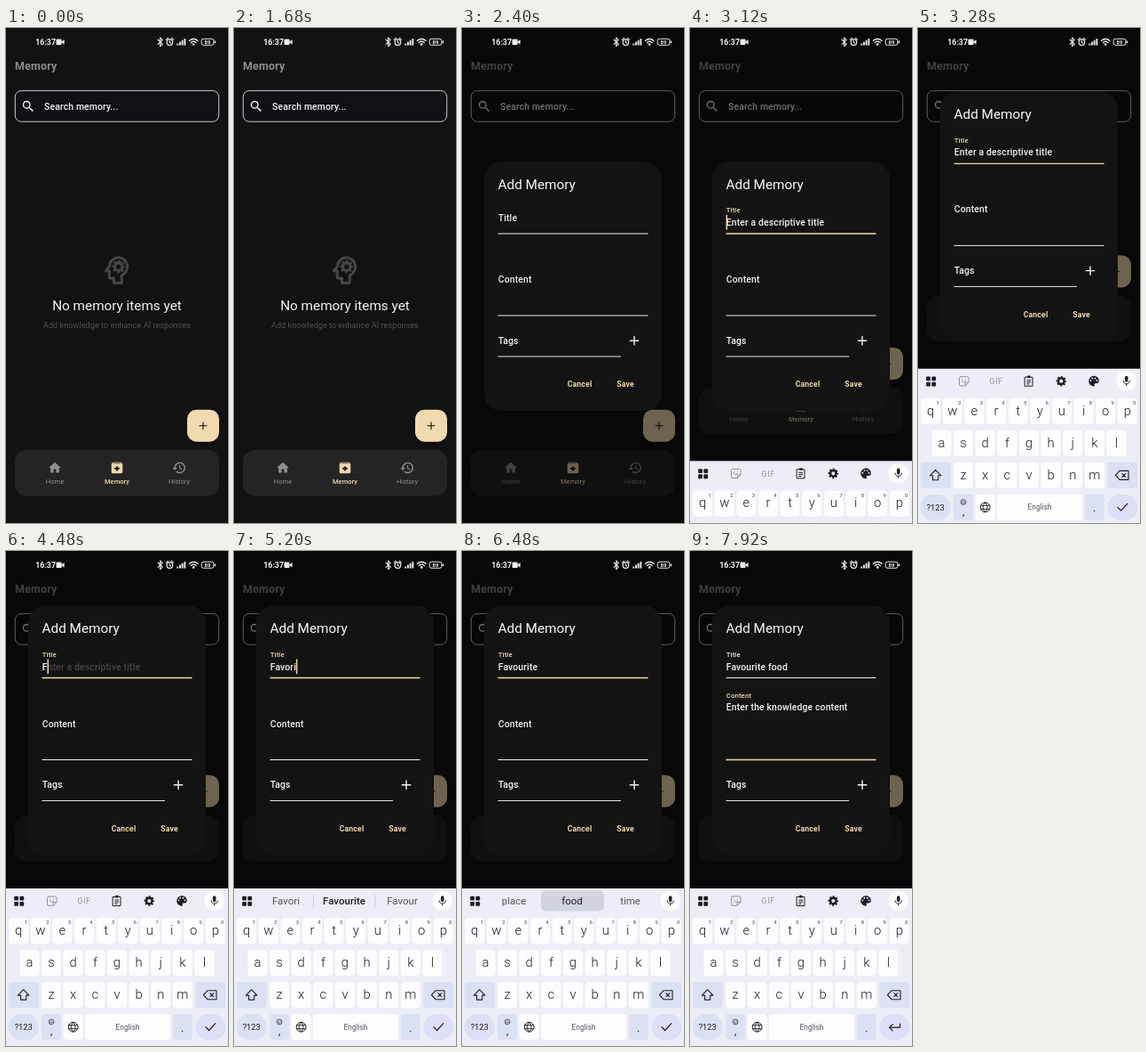
These frames come from a looping animation (250 px wide and 556 px high, 8 s). An HTML page:

```html
<!DOCTYPE html>
<html lang="en">
<head>
<meta charset="utf-8">
<title>Add memory</title>
<style>
html, body { margin: 0; width: 100%; height: 100%; overflow: hidden; background: #121212; }
svg { display: block; width: 100%; height: 100%; }
text { font-family: Roboto, "Noto Sans", sans-serif; white-space: pre; }
.m { text-anchor: middle; }
.field { font-size: 10.4px; font-weight: 500; letter-spacing: .15px; fill: #f4f4f4; }
.line { fill: none; stroke-linecap: round; stroke-linejoin: round; }
</style>
</head>
<body>
<svg id="stage" viewBox="0 0 250 556"></svg>
<script>
const GOLD = '#f0d9ae', INK = '#1d1d22', KEY = '#fdfdff', SIDE = '#dce0f3';
const KEYBOARD = 177;

const text = (x, y, s, size, fill, more = '') =>
  `<text x="${x}" y="${y}" font-size="${size}" fill="${fill}" ${more}>${s}</text>`;
const mid = (x, y, s, size, fill, more = '') => text(x, y, s, size, fill, 'class="m" ' + more);
const rect = (x, y, w, h, r, fill, more = '') =>
  `<rect x="${x}" y="${y}" width="${w}" height="${h}" rx="${r}" fill="${fill}" ${more}/>`;
const line = (d, color, w, more = '') =>
  `<path class="line" d="${d}" stroke="${color}" stroke-width="${w}" ${more}/>`;
const circle = (x, y, r, fill, more = '') => `<circle cx="${x}" cy="${y}" r="${r}" fill="${fill}" ${more}/>`;
// Places content drawn on a 24-unit grid, centred on x, y
const icon = (x, y, size, body) =>
  `<g transform="translate(${x - size / 2} ${y - size / 2}) scale(${size / 24})">${body}</g>`;
const solid = (d, fill) => `<path d="${d}" fill="${fill}" fill-rule="evenodd"/>`;
const gear = (fill, r) =>
  circle(12, 12, r * .6, 'none', `stroke="${fill}" stroke-width="${r * .46}"`) +
  circle(12, 12, r * .87, 'none',
    `stroke="${fill}" stroke-width="${r * .32}" pathLength="16" stroke-dasharray="1 1" stroke-dashoffset=".5"`);

const HOME = 'M10 20v-6h4v6h5v-8h3L12 3 2 12h3v8z';
const BOX = 'M20.5 5.2L19.1 3.5Q18.7 3 18 3H6Q5.3 3 4.8 3.5L3.5 5.2Q3 5.8 3 6.5V19a2 2 0 0 0 2 2h14a2 2 0 0 0 2-2V6.5Q21 5.8 20.5 5.2zM12 17.5L6.5 12H10v-2h4v2h3.5zM5.1 5l.8-1h12l.9 1z';
const HISTORY = 'M13 3a9 9 0 0 0-9 9H1l3.9 3.9L9 12H6a7 7 0 1 1 2.06 4.94l-1.42 1.42A9 9 0 1 0 13 3zM12 8v5l4.3 2.5.7-1.2-3.5-2.1V8z';
const SEARCH = 'M15.5 14h-.8l-.3-.3A6.5 6.5 0 1 0 13.7 14.4l.3.3v.8l5 5 1.5-1.5zM9.5 14a4.5 4.5 0 1 1 0-9 4.5 4.5 0 0 1 0 9z';
const MIC = 'M12 14a3 3 0 0 0 3-3V5a3 3 0 0 0-6 0v6a3 3 0 0 0 3 3zM17.3 11a5.3 5.3 0 0 1-10.6 0H5c0 3.4 2.7 6.2 6 6.7V21h2v-3.3c3.3-.5 6-3.3 6-6.7z';
const HEAD = 'M13 4a6.2 6.2 0 0 0-6 6L4.8 12.7H7v3.8a1 1 0 0 0 1 1h2v3h5v-4.8A6.1 6.1 0 0 0 13 4z';
const PALETTE = 'M12 3a9 9 0 0 0 0 18q1.5 0 1.5-1.5l-.4-1q-1-2.5 1.1-2.5H16a5 5 0 0 0 5-5c0-4.4-4-8-9-8z';

function page() {
  const tab = (x, d, name, fill, weight) =>
    icon(x, 494, 16.7, solid(d, fill)) + mid(x, 511.6, name, 7.6, fill, `font-weight="${weight}"`);
  return rect(0, 0, 250, 556, 0, '#121212') +
    text(10, 47, 'Memory', 12.5, '#8d8d8d', 'font-weight="700" letter-spacing=".15"') +
    rect(10.3, 70.4, 229.4, 34.8, 7, '#101015', 'stroke="#e2e2e2" stroke-width=".9"') +
    icon(25, 88, 16.7, solid(SEARCH, '#f5f5f5')) +
    text(43, 91.5, 'Search memory...', 10.4, '#eee', 'class="field"') +
    `<g id="empty">` +
    icon(125, 271.6, 41.7, line(HEAD, '#454545', 1.8) + icon(13, 10, 10, gear('#454545', 10))) +
    mid(125, 317.3, 'No memory items yet', 15.3, '#f4f4f4') +
    mid(125, 336.7, 'Add knowledge to enhance AI responses', 9, '#505050', 'letter-spacing=".1"') +
    `</g><g id="bottom">` +
    rect(10, 474, 230, 51.5, 13, '#242424') +
    tab(55, HOME, 'Home', '#8f8f8f', 400) + tab(125, BOX, 'Memory', GOLD, 500) + tab(195, HISTORY, 'History', '#8f8f8f', 400) +
    rect(203, 430, 38, 38, 12, '#000', 'opacity=".2"') +
    rect(204, 428.7, 36, 36, 10.5, GOLD) + line('M218 446.7h8M222 442.7v8', '#111', 1.1) + `</g>`;
}

function dialog() {
  const under = (id, y, x2) =>
    `<line id="${id}" x1="40.5" x2="${x2}" y1="${y}" y2="${y}" stroke="#e8e8e8" stroke-width="1"/>`;
  const field = (id, x, y, s) => `<text id="${id}" class="field" x="${x}" y="${y}">${s}</text>`;
  const button = (x, s) => text(x, 403.1, s, 8.7, GOLD, 'font-weight="600" letter-spacing=".15"');
  return rect(25, 150, 200, 280, 19.5, '#131313') +
    text(40.6, 180.8, 'Add Memory', 15.3, '#f8f8f8') +
    field('label1', 0, 0, 'Title') + field('hint1', 40.7, 222, 'Enter a descriptive title') +
    field('value', 40.7, 222, '') + under('under1', 231, 209.5) +
    field('label2', 0, 0, 'Content') + field('hint2', 40.7, 267.6, 'Enter the knowledge content') +
    under('under2', 323, 209.5) +
    field('label3', 40.7, 354.7, 'Tags') + under('under3', 369, 179) +
    line('M189.3 351.2h9.4M194 346.5v9.4', '#f2f2f2', 1.4, 'stroke-linecap="butt"') +
    button(118.7, 'Cancel') + button(174.2, 'Save') +
    rect(0, 0, 1.5, 16.6, 0, GOLD, 'id="caret"');
}

function status() {
  const w = '#ececec';
  const bars = [0, 1, 2, 3].map(i => rect(192.3 + i * 2.7, 17.4 - i * 1.8, 1.9, 2 + i * 1.8, .3, w)).join('');
  return text(33.3, 18.9, '16:37', 8.8, '#f5f5f5', 'font-weight="700"') +
    rect(56.5, 12.5, 6.2, 6.4, 1.2, w) + `<path d="M62 15.7l3.6-2.8v5.6z" fill="${w}"/>` +
    line('M171 13l5.200 5-2.600 2.500v-9.600l2.600 2.500-5.200 5', w, 1.1) +
    circle(184.4, 16, 3.3, 'none', `stroke="${w}" stroke-width="1.2"`) +
    line('M184.400 14.300v1.900l1.200.8M180.300 13.100l2.200-1.900M188.500 13.100l-2.200-1.900', w, 1.1) +
    bars + line('M206.400 14.300q4.800-4.200 9.600 0M208.200 16.400q3-2.700 6 0', w, 1.4) + circle(211.2, 18.4, 1.4, w) +
    rect(220.2, 12.2, 13.6, 7, 2, 'none', `stroke="${w}"`) + rect(234.6, 14.2, 1.4, 3, .5, w) +
    mid(227, 17.9, '89', 6, w, 'font-weight="700"');
}

function keyboard() {
  const step = 24.62, rowY = i => 426.7 + 36 * i;
  const key = (x, y, w, fill, r = 4) => rect(x - w / 2, y - 14.6, w, 29.2, r, fill);
  let s = rect(0, 379, 250, 180, 0, '#ecedf6');
  ['qwertyuiop', 'asdfghjkl', 'zxcvbnm'].forEach((row, i) => {
    [...row].forEach((c, j) => {
      const x = [14.2, 26.5, 51.1][i] + step * j, y = rowY(i);
      s += key(x, y, 22, KEY) + mid(x, y + 4.2, c, 14.8, INK, 'font-weight="350" data-key');
      if (!i) s += mid(x + 8, y - 7.3, (j + 1) % 10, 6, '#44444c');
    });
  });
  const y3 = rowY(2), y4 = rowY(3);
  s += key(19.7, y3, 34, SIDE) + line(`M19.7 ${y3 - 6}l6.3 6.4h-3.2v5h-6.2v-5h-3.2z`, INK, 1.1, 'id="shift"');
  s += key(230.3, y3, 34, SIDE) + line(`M227 ${y3 - 5}h10v10h-10l-4.6-5zM229.8 ${y3 - 2}l4 4m0-4l-4 4`, INK, 1.1);
  s += key(19.7, y4, 34, SIDE, 14.6) + mid(19.7, y4 + 3.3, '?123', 9.3, INK);
  s += key(51.1, y4, 22, SIDE) + mid(51.1, y4 + 8.6, ',', 12, INK) +
    circle(51.1, y4 - 5.8, 2.9, 'none', `stroke="${INK}" stroke-width=".7"`) +
    line(`M49.7 ${y4 - 5.2}q1.4 1.7 2.8 0M50 ${y4 - 6.8}v.1M52.2 ${y4 - 6.8}v.1`, INK, .7);
  s += key(75.6, y4, 22, KEY) + circle(75.6, y4, 5.4, 'none', `stroke="${INK}"`) +
    line(`M70.5 ${y4 - 2}h10.2m0 4h-10.2M75.6 ${y4 - 5.4}q-5 5.4 0 10.8q5-5.4 0-10.8`, INK, .9);
  s += key(137, y4, 96, KEY) + mid(137, y4 + 3, 'English', 8.3, '#55555e');
  s += key(198.8, y4, 22, SIDE) + mid(198.8, y4 + 5, '.', 13, INK);
  s += key(230.3, y4, 34, '#dcdff7', 14.6) +
    line(`M225 ${y4}l3.6 3.8 7.2-7.8`, INK, 1.2, 'id="check"') +
    line(`M236.5 ${y4 - 3.5}v4h-12m3.6-3.6l-3.6 3.6 3.6 3.6`, INK, 1.2, 'id="return"');

  // Strip above the keys
  s += rect(9.2, 387.8, 4.8, 4.8, 1, INK) + rect(15.4, 387.8, 4.8, 4.8, 1.2, INK) +
    rect(9.2, 394, 4.8, 4.8, 1, INK) + rect(15.4, 394, 4.8, 4.8, 1, INK) +
    circle(234.7, 393, 11.2, KEY) + icon(234.7, 393, 14, solid(MIC, INK));
  const gray = '#9293a0';
  s += `<g id="tools">` +
    line('M48 388h7.5q1.5 0 1.5 1.5v5l-3.7 3.8h-5.3q-1.500 0-1.500-1.500v-7.300q0-1.500 1.500-1.500zM53.300 398v-3.500h3.500M49.800 391v.2M53.600 391v.2M49.700 393.300q1.900 1.800 3.800 0', gray, 1) +
    mid(88.2, 396.2, 'GIF', 8.6, gray, 'letter-spacing=".8"') +
    line('M120.5 388.5h8.5v10h-8.5zM122.8 392h3.9m0 2.1h-3.9m0 2.1h2.4', INK, 1) + rect(123, 386.8, 3.6, 2.6, 1, INK) +
    icon(161.3, 393, 14, gear(INK, 9.6)) +
    icon(198, 393, 15.5, solid(PALETTE, INK) +
      [[6.5, 11], [9.5, 7], [14.5, 7], [17.5, 11]].map(([x, y]) => circle(x, y, 1.5, '#ecedf6')).join('')) +
    `</g><g id="words">` + line('M89.5 386.5v13M159 386.5v13', '#c3c4cf', .8) +
    rect(89, 381.5, 70.5, 23, 5, '#d2d3dd', 'id="press"') +
    [58.5, 124, 189.5].map((x, i) => mid(x, 397, '', 11.5, i === 1 ? INK : '#55555e', 'data-word')).join('') + `</g>`;
  return s;
}

const stage = document.getElementById('stage');
stage.innerHTML = page() + rect(0, 0, 250, 556, 0, '#000', 'id="scrim"') +
  `<g id="dialog">${dialog()}</g>` + status() + `<g id="keyboard">${keyboard()}</g>`;

const el = {};
stage.querySelectorAll('[id]').forEach(e => el[e.id] = e);
const keys = [...stage.querySelectorAll('[data-key]')], words = [...stage.querySelectorAll('[data-word]')];
const letters = keys.map(k => k.textContent);

const ramp = (t, a, b) => Math.min(1, Math.max(0, (t - a) / (b - a)));
const out = u => 1 - (1 - u) ** 3;
const mix = (a, b, u) => a + (b - a) * u;
const within = (t, ...spans) => spans.some(([a, b]) => t >= a && t < b);
const last = (list, t) => list.reduce((v, [at, x]) => t >= at ? x : v, list[0][1]);
const set = (e, attrs) => { for (const k in attrs) e.setAttribute(k, attrs[k]); };
const show = (e, on) => set(e, { opacity: +on });
const write = (e, s) => { if (e.textContent !== s) e.textContent = s; };

const TYPED = [[0, ''], [4400, 'F'], [4560, 'Fa'], [4720, 'Fav'], [4960, 'Favo'], [5080, 'Favor'], [5160, 'Favori'],
  [5520, 'Favourite '], [6560, 'Favourite food ']];

// Floating label and underline of one field
function field(n, focus, lift, restY, topY) {
  const s = mix(1, .75, lift), tint = `color-mix(in srgb, ${GOLD} ${focus * 100}%, #f0f0f0)`;
  set(el['label' + n], { transform: `translate(40.7 ${mix(restY, topY, lift)}) scale(${s})` });
  el['label' + n].style.fill = tint;
  const u = el['under' + n];
  u.style.stroke = tint;
  set(u, { 'stroke-width': mix(1, 1.4, focus) });
}

function draw(t) {
  const fade = out(ramp(t, 1700, 1920));
  set(el.scrim, { opacity: .54 * fade });
  const rise = u => out(ramp(u, 3078, 3358));
  const up = KEYBOARD * rise(t);
  set(el.dialog, { opacity: fade, transform: `translate(0 ${-KEYBOARD / 2 * rise(t - 58)})` });
  set(el.bottom, { transform: `translate(0 ${-up})` });
  set(el.empty, { transform: `translate(0 ${-up / 2})` });
  set(el.keyboard, { transform: `translate(0 ${KEYBOARD - up})` });
  show(el.keyboard, up > 0);

  const first = out(ramp(t, 2780, 2950)), second = out(ramp(t, 7020, 7190));
  field(1, first - second, first, 216.8, 207.2);
  field(2, second, second, 286, 253.2);
  set(el.hint1, { opacity: ramp(t, 2800, 2960) * (1 - ramp(t, 4380, 4510)) });
  set(el.hint2, { opacity: ramp(t, 7040, 7200) });

  const typed = last(TYPED, t);
  write(el.value, typed);
  const inBody = t >= 7040;
  set(el.caret, { x: 40.6 + (typed && !inBody ? el.value.getComputedTextLength() : 0), y: inBody ? 255.5 : 210 });
  show(el.caret, within(t, [2800, 3260], [3760, 4260], [4380, 6100], [6560, 7500]));

  const caps = within(t, [3920, 4400]);
  keys.forEach((k, i) => write(k, caps ? letters[i].toUpperCase() : letters[i]));
  el.shift.style.fill = caps ? INK : 'none';
  show(el.check, t < 7160);
  show(el.return, t >= 7160);

  const suggest = within(t, [4560, 7400]);
  show(el.tools, !suggest);
  show(el.words, suggest);
  show(el.press, within(t, [5380, 5540], [6420, 6580]));
  const list = last([[0, [last(TYPED, Math.min(t, 5500)), 'Favourite', 'Favour']],
    [5600, ['place', 'food', 'time']], [6640, ['is', 'and', 'for']]], t);
  words.forEach((w, i) => write(w, list[i]));
  set(words[1], { 'font-weight': t < 5600 ? 450 : 400 });
}

function frame() {
  draw(performance.now() % 8000);
  requestAnimationFrame(frame);
}
frame();
</script>
</body>
</html>
```
